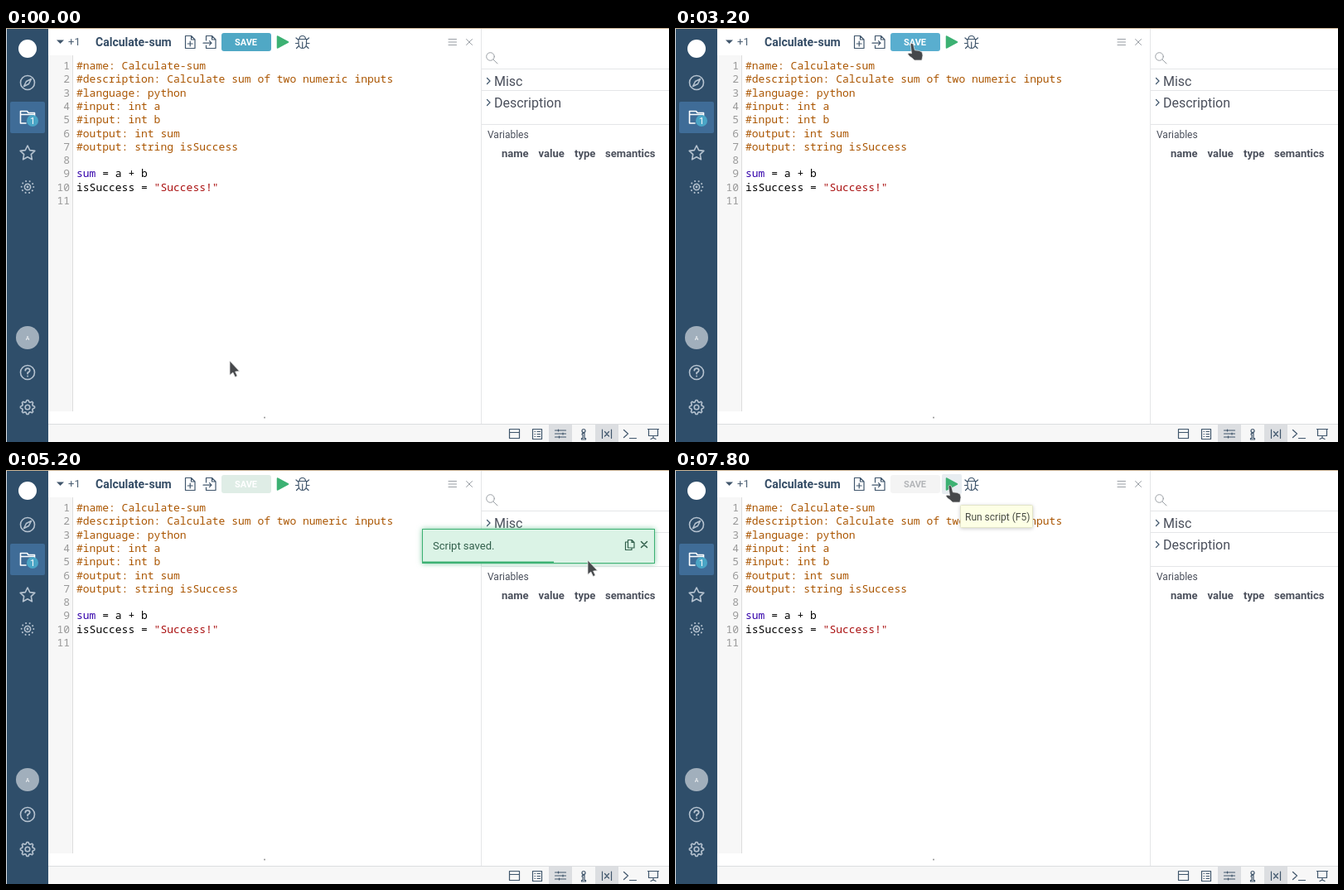
Recreate the animation shown at these times as an HTML page. Size 800 by 500 pixels, loop 8 s.

```html
<!DOCTYPE html>
<html lang="en">
<head>
<meta charset="utf-8">
<title>Script editor</title>
<style>
  html, body { margin: 0; width: 100%; height: 100%; overflow: hidden; background: #fff; }
  svg { display: block; width: 800px; height: 500px; font-family: Roboto, sans-serif; }
  .line { fill: none; stroke-width: 1.2; stroke-linecap: round; stroke-linejoin: round; }
  .side { stroke: #b5c2cf; stroke-width: 1.6; }
  .dark { stroke: #40566c; }
  .pale { stroke: #9a9fa5; stroke-width: 1; }
  .code { font: 13px "Noto Sans Mono", "DejaVu Sans Mono", monospace; white-space: pre; }
  .bold { font-weight: 700; }
  .tip rect { fill: #fdffe5; stroke: #e2e4c8; filter: drop-shadow(0 1px 2px #0003); }
  .tip text { font-size: 12px; fill: #4a4d45; }
  .cursor path { fill: #46484b; stroke: #e9e9e9; stroke-width: .7; stroke-linejoin: round; }
</style>
</head>
<body>
<svg viewBox="0 0 800 500">
  <!-- Sidebar -->
  <rect width="1" height="500" fill="#d9dce0"/>
  <rect x="1" width="50" height="500" fill="#2f4e6a"/>
  <rect x="5" y="89" width="42" height="38" rx="2" fill="#3f6c97"/>
  <circle cx="26" cy="25" r="11" fill="#fff"/>
  <g class="line side">
    <circle cx="26" cy="66" r="8.5"/>
    <path d="M30.5 61.5l-3 6-6 3 3-6z"/>
    <path d="M26 142l2.7 5.6 6.1.8-4.5 4.3 1.1 6.1-5.4-3-5.4 3 1.1-6.1-4.5-4.3 6.1-.8z"/>
    <circle cx="26" cy="192" r="7.3" stroke-dasharray=".1 4.5" stroke-width="2"/>
    <circle cx="26" cy="192" r="3.6" stroke-dasharray="1.5 1.3"/>
    <circle cx="26" cy="192" r=".6"/>
    <circle cx="26" cy="416" r="8.5"/>
    <path d="M23.3 413.6q.3-2.5 2.8-2.5t2.7 2.4q0 1.5-2.7 2.9v1.2m0 2.8v.1" stroke-width="1.8"/>
    <path id="cog"/>
    <circle cx="26" cy="458" r="2.8"/>
    <path d="M24 115h-6.5v-14.5h8l1.5 2h7.5v4M17.5 104.5h17" stroke="#fff"/>
  </g>
  <circle cx="32" cy="112" r="7" fill="#4aa5c6"/>
  <text x="32" y="116" font-size="11" fill="#fff" text-anchor="middle">1</text>
  <circle cx="26" cy="374" r="14" fill="#a1afbc"/>
  <text x="26" y="376.500" font-size="7" fill="#fff" text-anchor="middle">A</text>

  <!-- Toolbar -->
  <path d="M61 14.500h9l-4.500 4.500z" fill="#40566c"/>
  <text x="75" y="21" font-size="13" fill="#4d6074">+1</text>
  <text class="bold" x="108" y="22" font-size="14" fill="#354d66">Calculate-sum</text>
  <g class="line dark">
    <path d="M216.500 9.500h7l4.500 4.500v10.500h-11.500zM223.500 9.500v4.500h4.500M222.200 16v6m-3-3h6"/>
    <path d="M241.500 15v-5.500h7l4.500 4.500v10.500h-11.500v-3.500M248.500 9.500v4.500h4.500M238 18.200h10m-2.500-2.500l2.500 2.500-2.500 2.500"/>
    <path d="M354 13.500q0-4 3.700-4t3.700 4zM353 13.500h9.500v6q-.8 5-4.700 5t-4.800-5zM357.700 17v7.500M350 12l3 2.500M365.500 12l-3 2.500M349.500 18.500h3.500M366 18.500h-3.500M350.500 24.500l3-3M365 24.500l-3-3"/>
  </g>
  <rect id="button" x="260" y="6" width="60" height="22" rx="3"/>
  <text id="label" class="bold" x="289.500" y="21" font-size="11" text-anchor="middle"></text>
  <rect id="hover" x="322" y="5" width="24" height="24" rx="2" fill="#e8edf1"/>
  <path d="M327.500 10v14l13-7z" fill="#3cb173" stroke="#3cb173" stroke-width="1.500" stroke-linejoin="round"/>
  <path class="line pale" d="M534 13.500h9.500m-9.500 3.500h9.500m-9.500 3.500h9.500M555.500 13.500l7 7m0-7l-7 7"/>

  <!-- Editor -->
  <rect x="51" y="33" width="29" height="430" fill="#f7f7f7"/>
  <rect x="80" y="33" width="1" height="430" fill="#ddd"/>
  <g id="code" class="code"></g>
  <circle cx="312" cy="470.500" r=".9" fill="#888"/>

  <!-- Context panel -->
  <g fill="#e5e6e8">
    <rect x="573" y="1" width="1" height="477"/>
    <rect x="574" y="49" width="226" height="1"/>
    <rect x="574" y="75" width="226" height="1"/>
    <rect x="574" y="116" width="226" height="1"/>
  </g>
  <g class="line pale"><circle cx="584.500" cy="34.500" r="4.800"/><path d="M588 38l5 5"/></g>
  <path class="line dark" d="M580.500 60.500l3.500 3.500-3.500 3.500M580.500 86.500l3.500 3.500-3.500 3.500"/>
  <g fill="#4b505c">
    <text x="589" y="70" font-size="16">Misc</text>
    <text x="589" y="96" font-size="16">Description</text>
    <text x="581" y="133" font-size="12">Variables</text>
    <g class="bold" font-size="13">
      <text x="598" y="156">name</text>
      <text x="642.500" y="156">value</text>
      <text x="686" y="156">type</text>
      <text x="723" y="156">semantics</text>
    </g>
  </g>

  <!-- Status bar -->
  <rect x="51" y="478" width="749" height="22" fill="#f7f7f7"/>
  <rect x="51" y="478" width="749" height="1" fill="#dcdee0"/>
  <path d="M655 479h28v21h-28zM711 479h28v21h-28z" fill="#dcdee1"/>
  <g class="line dark">
    <path d="M607.500 484.500h12v11h-12zM607.500 488.500h12"/>
    <path d="M635.500 484.500h11v12h-11zM638 487.500h.5m2.500 0h3.500m-6.500 3h.5m2.500 0h3.500m-6.500 3h.5m2.500 0h3.500"/>
    <path d="M662.500 486h13m-13 4h13m-13 4h13M666.500 485v2M672 489v2M667.500 493v2" />
    <path d="M695.500 489.500h2.500v6h1.500v1.500h-5v-1.500h1.500v-4.500h-1zM695 486.500a2 2 0 1 1 4 0a2 2 0 1 1-4 0"/>
    <path d="M719.500 485v10.500M730.500 485v10.500M722.500 487.500l5 5.500m0-5.500l-5 5.500"/>
    <path d="M745.500 485.500l5 4.500-5 4.500M752.500 495.500h8"/>
    <path d="M774.500 484.500h13M775.500 484.500v8h11v-8M781 492.500v2.500m-3 1.500l3-1.500 3 1.500"/>
  </g>
  <rect width="800" height="1" fill="#c9b293"/>

  <!-- Overlays -->
  <g id="toast">
    <rect x="502.500" y="71.500" width="280" height="41" fill="#dbf3e6" stroke="#3cb173"
      style="filter: drop-shadow(0 0 3px #3cb173aa)"/>
    <text x="515" y="96" font-size="13" fill="#315f4b">Script saved.</text>
    <rect id="bar" x="503" y="110.500" height="1.500" fill="#3cb173"/>
    <g id="actions" class="line" stroke="#315f4b">
      <path d="M750.500 84.500h4.500l3 3v6.500h-7.500zM755 84.500v3h3M750.500 87h-3v9.500h7.500v-2.500"/>
      <path d="M766.500 86.500l7 7m0-7l-7 7" stroke-width="1.500"/>
    </g>
  </g>
  <g id="saveTip" class="tip">
    <rect x="287.500" y="34.500" width="111" height="27" rx="1"/>
    <text x="293" y="52.500">Save script (Ctrl+S)</text>
  </g>
  <g id="runTip" class="tip">
    <rect x="344.500" y="42.500" width="87" height="27" rx="1"/>
    <text x="350" y="60.500">Run script (F5)</text>
  </g>
  <g id="cursor" class="cursor">
    <path id="arrow" d="M0 0v17.200l3.800-3.200 2.700 5.500 2.600-1.200-2.500-5.300 5-.5z"/>
    <path id="hand" d="M-2 1.500q1.500-2 3.500 0l1.800 7.300q5.500.1 8.700 2.200l1 4-1.200 6h-8.800l-3.200-3q-3.500-1.500-5-4.800q1.500-1.500 4.700-.4z"/>
    <path id="beam" d="M-4-9.500h3l1 .8 1-.8h3v1.500h-2.500l-.7.700v14.600l.7.700h2.500v1.500h-3l-1-.8-1 .8h-3v-1.500h2.500l.7-.7v-14.600l-.7-.7h-2.500z"/>
  </g>
</svg>
<script>
const $ = id => document.getElementById(id);
const show = (id, on) => $(id).setAttribute("display", on ? "inline" : "none");
const inside = (x, y, l, t, r, b) => x >= l && x <= r && y >= t && y <= b;

const comments = ["name: Calculate-sum", "description: Calculate sum of two numeric inputs",
  "language: python", "input: int a", "input: int b", "output: int sum", "output: string isSuccess"];
const lines = comments.map(s => `<tspan fill="#a50">#${s}</tspan>`).concat("",
  '<tspan fill="#30a">sum</tspan> = a + b',
  'isSuccess = <tspan fill="#a11">"Success!"</tspan>', "");
$("code").innerHTML = lines.map((s, i) => {
  const y = 50 + i * 16.3;
  return `<text x="77" y="${y}" text-anchor="end" fill="#999">${i + 1}</text><text x="85" y="${y}">${s}</text>`;
}).join("");

// Eight teeth, four points each
$("cog").setAttribute("d", "M" + Array.from({ length: 32 }, (_, i) => {
  const r = i % 4 < 2 ? 8.6 : 6.6, a = (i - 0.5) * Math.PI / 16;
  return `${26 + r * Math.cos(a)} ${458 + r * Math.sin(a)}`;
}).join("L") + "z");

// Pointer path: time, x, y
const track = [[0, 270, 402], [200, 262, 355], [400, 238, 240], [600, 231, 209], [1000, 231, 209],
  [1200, 222, 200], [1400, 198, 178], [1600, 186, 168], [1800, 186, 168], [2000, 192, 158],
  [2400, 262, 48], [2600, 286, 18], [4200, 286, 18], [4400, 320, 45], [4800, 560, 148],
  [5000, 660, 125], [5200, 702, 109], [5400, 753, 101], [5600, 765, 94], [6200, 771, 90],
  [6600, 771, 90], [6800, 735, 80], [7200, 470, 44], [7400, 370, 26], [7600, 329, 20], [7800, 332, 18]];

function pointer(t) {
  const i = track.findIndex(k => k[0] >= t);
  if (i < 1) return track[0].slice(1);
  const [a, b] = [track[i - 1], track[i]], k = (t - a[0]) / (b[0] - a[0]);
  return [a[1] + (b[1] - a[1]) * k, a[2] + (b[2] - a[2]) * k];
}

function buttonColor(t) {
  if (t < 2600) return "#50a8c5";
  if (t < 3600) return "#59aecf";
  const k = Math.min(1, Math.max(0, (t - 4600) / 680));
  return `rgb(${[69, 185, 124].map(c => Math.round(c + (244 - c) * k))})`;
}

function draw(now) {
  const t = Math.floor(now % 8000 / 200) * 200; // five pictures per second
  const [x, y] = pointer(t);
  const toast = t >= 3600 && t < 6600;

  $("button").setAttribute("fill", buttonColor(t));
  $("label").textContent = t >= 3600 && t < 4600 ? "SAVED!" : "SAVE";
  $("label").setAttribute("fill", t < 5400 ? "#fff" : "#b3b5b8");
  show("hover", t >= 7600);
  show("saveTip", t >= 3600 && t < 4400);
  show("runTip", t >= 7600);

  show("toast", toast);
  show("actions", t >= 5200);
  // The countdown stops while the pointer is over the message
  $("bar").setAttribute("width", 280 - Math.max(0, Math.min(t, 5035) - 3600) * 0.085);

  const onToast = toast && inside(x, y, 502, 71, 783, 113);
  const hand = inside(x, y, 260, 6, 346, 28) || onToast && inside(x, y, 762, 82, 778, 98);
  const beam = !onToast && inside(x, y, 81, 36, 573, 217);
  show("hand", hand);
  show("beam", beam);
  show("arrow", !hand && !beam);
  $("cursor").setAttribute("transform", `translate(${x} ${y})`);
}

const start = performance.now();
function frame() {
  draw(performance.now() - start);
  requestAnimationFrame(frame);
}
frame();
</script>
</body>
</html>
```
